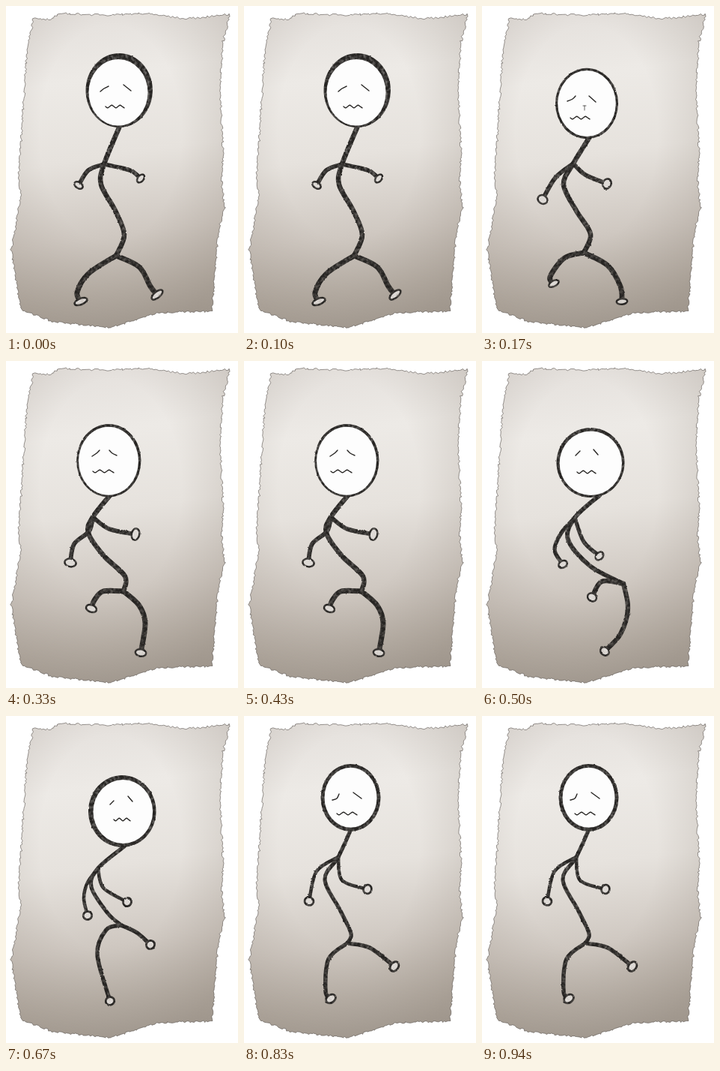
Animation, 310 px wide and 436 px high, one loop 1.01 s. Source, as an HTML page:

```html
<!DOCTYPE html>
<html lang="en">
<head>
<meta charset="utf-8">
<title>Weary walk</title>
<style>
html, body { margin: 0; width: 100%; height: 100%; overflow: hidden; background: #fff; }
svg { display: block; width: 310px; height: 436px; }
</style>
</head>
<body>
<svg id="stage" viewBox="0 0 310 436">
  <defs>
    <linearGradient id="tone" x1="0.45" y1="0" x2="0.55" y2="1">
      <stop offset="0" stop-color="#e5e1dd"/>
      <stop offset="0.2" stop-color="#edeae6"/>
      <stop offset="0.45" stop-color="#e6e2dd"/>
      <stop offset="0.7" stop-color="#cfc8c1"/>
      <stop offset="0.88" stop-color="#b8b0a7"/>
      <stop offset="1" stop-color="#a9a198"/>
    </linearGradient>
    <radialGradient id="shade" gradientUnits="userSpaceOnUse" cx="0" cy="0" r="1"
      gradientTransform="translate(140 170) scale(190 290)">
      <stop offset="0.5" stop-color="#6f6255" stop-opacity="0"/>
      <stop offset="1" stop-color="#6f6255" stop-opacity="0.2"/>
    </radialGradient>
    <filter id="pencil" filterUnits="userSpaceOnUse" x="0" y="0" width="310" height="436" color-interpolation-filters="sRGB">
      <feTurbulence type="fractalNoise" baseFrequency="0.25" numOctaves="2" seed="3" result="n"/>
      <feDisplacementMap in="SourceGraphic" in2="n" scale="2" xChannelSelector="R" yChannelSelector="G" result="d"/>
      <feColorMatrix in="n" values="0 0 0 0 0  0 0 0 0 0  0 0 0 0 0  0 0 -0.8 0 1.3" result="g"/>
      <feComposite in="d" in2="g" operator="in"/>
      <feGaussianBlur stdDeviation="0.35"/>
    </filter>
  </defs>
</svg>
<script>
const stage = document.getElementById('stage');
const INK = '#262422';

function add(parent, tag, attrs) {
  const el = document.createElementNS('http://www.w3.org/2000/svg', tag);
  for (const k in attrs) el.setAttribute(k, attrs[k]);
  parent.appendChild(el);
  return el;
}

let seed = 11;
function rnd() {
  seed = (seed * 16807) % 2147483647;
  return seed / 2147483647 - 0.5;
}

const points = text => text.split(' ').map(p => p.split(',').map(Number));

// Smooth path through a few key points
function curve(p) {
  const at = i => p[Math.max(0, Math.min(p.length - 1, i))];
  let d = 'M' + p[0];
  for (let i = 0; i < p.length - 1; i++) {
    const [a, b, c, e] = [-1, 0, 1, 2].map(k => at(i + k));
    d += 'C' + [
      b.map((v, j) => v + (c[j] - a[j]) / 6),
      c.map((v, j) => v - (e[j] - b[j]) / 6),
      c
    ].join(' ');
  }
  return d;
}

// Torn outline: straight runs broken up by seeded jitter
function tear(corners) {
  const out = [];
  corners.forEach((a, i) => {
    const b = corners[(i + 1) % corners.length];
    const n = Math.ceil(Math.hypot(b[0] - a[0], b[1] - a[1]) / 2.5);
    for (let k = 0; k < n; k++) out.push(a.map((v, j) => v + (b[j] - v) * k / n + rnd() * 2.8));
  });
  return 'M' + out.join('L') + 'Z';
}

function drawPaper() {
  const d = tear(points('37,17 60,18 72,10 130,12 188,10 240,17 262,15 299,11 290,48 286,110 ' +
    '290,190 288,235 292,270 284,298 275,407 202,409 140,429 62,421 20,405 7,325 20,252 17,228 28,60'));
  for (const fill of ['url(#tone)', 'url(#shade)']) add(stage, 'path', { d, fill });
  add(stage, 'path', { d, fill: 'none', stroke: '#5d5752', 'stroke-width': 0.9, opacity: 0.7 });
}

function line(parent, d, width) {
  add(parent, 'path', {
    d, fill: 'none', stroke: INK, 'stroke-width': width, 'stroke-linecap': 'round', 'stroke-linejoin': 'round'
  });
}

// A hand or foot lies across the end of its limb
function drawTip(parent, limb, [rx, ry], w) {
  const [u, v] = limb.slice(-2);
  const tilt = Math.atan2(v[1] - u[1], v[0] - u[0]) * 180 / Math.PI - 90;
  add(parent, 'ellipse', {
    rx: rx - w / 2, ry: ry - w / 2, transform: `translate(${v}) rotate(${tilt})`,
    fill: '#dedad6', stroke: INK, 'stroke-width': w
  });
}

function drawHead(ink, g, { at: [x, y], r: [rx, ry], ring, shift: [dx, dy] }) {
  add(ink, 'ellipse', { cx: x, cy: y, rx, ry, fill: INK });
  add(g, 'ellipse', { cx: x + dx, cy: y + dy, rx: rx - ring, ry: ry - ring, fill: '#fdfdfd' });
}

function drawFace(g, { brows, mouth: [x, y, width] }, weight) {
  brows.forEach(b => line(g, curve(points(b)), weight));
  const wave = [];
  for (let i = 0; i <= 9; i++) wave.push([x + width * i / 9, y + 1.8 * Math.sin(i * Math.PI / 2)]);
  line(g, curve(wave), weight);
}

const poses = [];

// The second spine point is the shoulder, the last one the hip
function pose({ ms, weight, head, spine, arms, legs, hand, foot, face, nose }) {
  const g = add(stage, 'g', { display: 'none' });
  const ink = add(g, 'g', { filter: 'url(#pencil)' });
  const back = points(spine);
  const rim = weight > 5.5 ? 2.5 : 2.8;
  const grow = (root, list) => list.map(text => [root, ...points(text)]);
  const upper = grow(back[1], arms), lower = grow(back[back.length - 1], legs);
  line(ink, curve(back), weight);
  upper.forEach(l => line(ink, curve(l), weight * 0.88));
  lower.forEach(l => line(ink, curve(l), weight * 1.05));
  drawHead(ink, g, head);
  upper.forEach(l => drawTip(ink, l, hand, rim));
  lower.forEach(l => drawTip(ink, l, foot, rim));
  drawFace(g, face, 1.4);
  if (nose) line(g, nose, 0.7);
  poses.push({ g, ms });
}

drawPaper();

pose({
  ms: 170, weight: 6.6,
  head: { at: [151.2, 112.5], r: [44.7, 49.5], ring: 5.2, shift: [-1.2, 2.8] },
  spine: '152,160 131,211 127,238 146,273 158,305 147,333',
  arms: ['110,219 97,239', '150,215 168,220 180,230'],
  legs: ['110,357 95,382 100,394', '178,348 193,374 202,385'],
  hand: [7.5, 5.2], foot: [10.2, 5.3],
  face: { brows: ['126,114 131,110 137,107', '157,105 167,113'], mouth: [133, 134, 25] }
});

pose({
  ms: 160, weight: 6.6,
  head: { at: [140, 130], r: [42, 47.2], ring: 3.2, shift: [0, 0] },
  spine: '143,176 122,210 109,238 126,273 145,304 136,329',
  arms: ['98,229 81,258', '138,225 167,237'],
  legs: ['110,336 91,361 96,370', '168,346 185,374 187,394'],
  hand: [8, 6.8], foot: [8.5, 5],
  face: { brows: ['114,127 121,124 125,120', '143,120 152,128'], mouth: [118, 149, 26] },
  nose: 'M135 133H139M137 133V139'
});

pose({
  ms: 170, weight: 6.6,
  head: { at: [137.3, 132.8], r: [43.2, 48.7], ring: 3.2, shift: [-0.3, 0.5] },
  spine: '139,179 116,208 110,229 130,259 159,287 157,307',
  arms: ['111,227 91,244 86,269', '138,224 173,231'],
  legs: ['130,307 118,319 114,330', '178,326 186,350 180,389'],
  hand: [9, 6.5], foot: [8.5, 6],
  face: { brows: ['115,127 121,123 125,119', '138,119 142,123 148,126'], mouth: [116, 147, 28] }
});

pose({
  ms: 170, weight: 6,
  head: { at: [145, 135.5], r: [45.5, 46.5], ring: 3.8, shift: [0.3, 0.8] },
  spine: '157,179 124,209 115,238 144,273 189,297',
  arms: ['106,229 97,252 108,271', '136,241 157,260'],
  legs: ['160,294 147,315', '195,330 185,364 164,387'],
  hand: [7.3, 5.8], foot: [7.5, 6.5],
  face: { brows: ['125,126 131,120', '149,118 155,125'], mouth: [127, 148, 25] }
});

pose({
  ms: 160, weight: 5.2,
  head: { at: [155.3, 127], r: [45.3, 48], ring: 5.5, shift: [1, 0.5] },
  spine: '158,174 123,203 114,228 136,263 154,279',
  arms: ['109,222 104,243 109,266', '130,229 162,248'],
  legs: ['134,285 122,318 139,380', '175,289 193,305'],
  hand: [7.2, 6.8], foot: [7.2, 6.8],
  face: { brows: ['139,118 144,113', '163,107 169,114'], mouth: [144, 138, 22] }
});

pose({
  ms: 180, weight: 5.2,
  head: { at: [142.5, 109], r: [40, 45], ring: 5, shift: [0, -0.3] },
  spine: '143,151 126,188 108,218 129,260 143,290 138,303',
  arms: ['97,207 87,247', '131,219 165,231'],
  legs: ['113,324 109,367 116,377', '168,309 201,334'],
  hand: [7.4, 6.8], foot: [8.4, 6.6],
  face: { brows: ['118,112 124,110 127,104', '146,102 157,110'], mouth: [124, 130, 27] }
});

const loop = poses.reduce((sum, p) => sum + p.ms, 0);
const start = performance.now();
let shown = null;

// Each drawing is held, then cut hard to the next
function draw(time) {
  let t = time % loop, i = 0;
  while (t >= poses[i].ms) t -= poses[i++].ms;
  if (poses[i] === shown) return;
  if (shown) shown.g.setAttribute('display', 'none');
  shown = poses[i];
  shown.g.removeAttribute('display');
}

function tick() {
  draw(performance.now() - start);
  requestAnimationFrame(tick);
}
tick();
</script>
</body>
</html>
```
